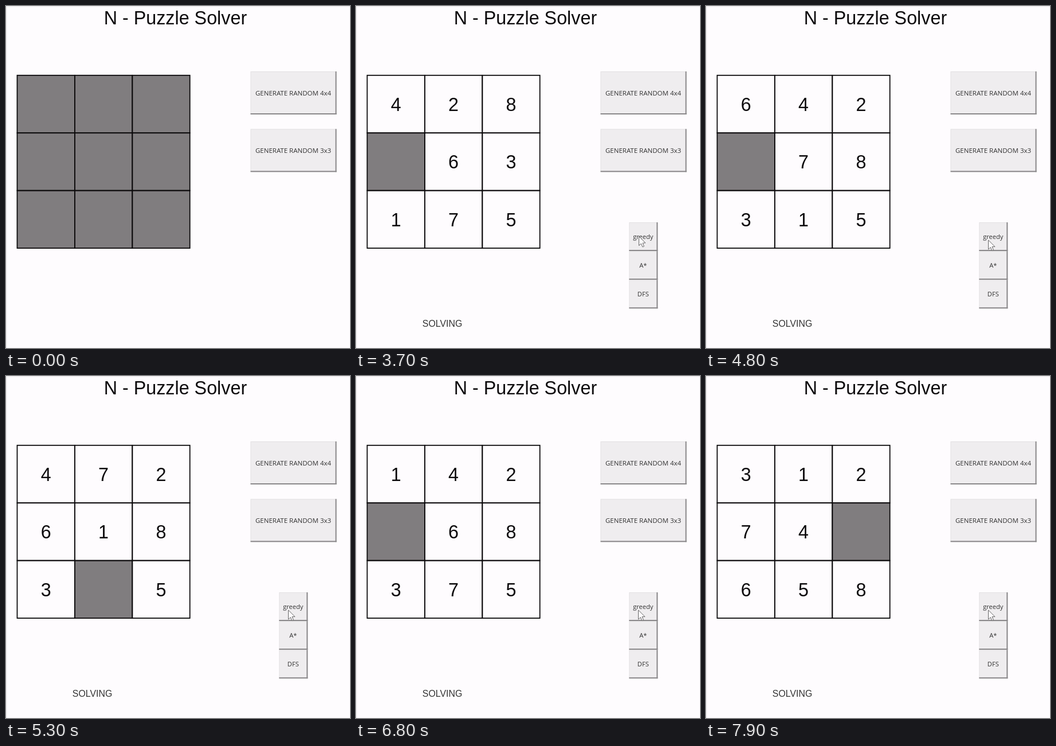
An HTML page with a canvas for the animation above (8 s loop, 600 px wide and 596 px high).

```html
<!DOCTYPE html>
<html lang="en">
<head>
<meta charset="utf-8">
<title>N - Puzzle Solver</title>
<style>
html, body { margin: 0; width: 100%; height: 100%; overflow: hidden; background: #fefcfe; }
canvas { display: block; }
</style>
</head>
<body>
<canvas id="stage" width="600" height="596"></canvas>
<script>
const ctx = document.getElementById('stage').getContext('2d');
const LOOP = 8000, BLOCK_AT = 1800, BOARD_AT = 1900, SOLVE_AT = 3700;
const STEP_START = 3660, STEP = 110;
const START = '4280' .slice(0, 3) + '063175';
const MOVES = '6382463713' + '647136471' + '471476376' + '3764137658'; // tile that slides into the gap
const GREY = '#807d7f', FACE = '#efedef';
const ARIAL = '"Liberation Sans", Arial, sans-serif';
const UI = '"Open Sans", "Noto Sans", sans-serif';

function rect(x, y, w, h, color) {
  ctx.fillStyle = color;
  ctx.fillRect(x, y, w, h);
}

function text(str, x, y, size, family, color) {
  ctx.font = `${size}px ${family}`;
  ctx.textAlign = 'center';
  ctx.fillStyle = color;
  ctx.fillText(str, x, y);
}

function button(label, x, y, w, h, size) {
  rect(x, y, w, h, '#e2e0e2');
  rect(x + 1, y + 1, w - 1, h - 1, FACE);
  rect(x, y + h - 2, w, 2, '#8a888a');
  rect(x + w - 2, y, 2, h, '#8a888a');
  text(label, x + w / 2 - 0.5, y + h / 2 + 4.2, size, UI, '#333');
}

function boardAt(t) {
  const cells = [...START];
  const count = Math.max(0, Math.floor((t - STEP_START) / STEP));
  for (const tile of MOVES.slice(0, count)) {
    const from = cells.indexOf(tile), gap = cells.indexOf('0');
    cells[gap] = tile;
    cells[from] = '0';
  }
  return cells;
}

function drawBoard(t) {
  const cells = t < BOARD_AT ? Array(9).fill('0') : boardAt(t);
  const size = 100.4;
  ctx.strokeStyle = '#0c0a0c';
  ctx.lineWidth = 1.8;
  cells.forEach((tile, i) => {
    const x = 19.5 + (i % 3) * size, y = 120.8 + Math.floor(i / 3) * size;
    rect(x, y, size, size, tile === '0' ? GREY : '#fefcfe');
    if (tile !== '0') text(tile, x + size / 2, y + 62, 32.3, ARIAL, '#0c0a0c');
  });
  for (let i = 0; i < 9; i++) {
    ctx.strokeRect(19.5 + (i % 3) * size, 120.8 + Math.floor(i / 3) * size, size, size);
  }
}

const ease = (t, a, b) => {
  const p = Math.min(1, Math.max(0, (t - a) / (b - a)));
  return p * p * (3 - 2 * p);
};

function drawCursor(t) {
  const go = ease(t, 2750, 3550), settle = ease(t, 3700, 4000);
  ctx.save();
  ctx.translate(450 + 43.5 * go - settle, 250 + 151.5 * go + 6.5 * settle);
  ctx.beginPath();
  [[0, 0], [0, 16], [3.8, 12.6], [6.4, 18.4], [9, 17.3], [6.5, 11.6], [11.4, 11.4]]
    .forEach(p => ctx.lineTo(...p));
  ctx.closePath();
  ctx.fillStyle = '#fefcfe';
  ctx.fill();
  ctx.strokeStyle = '#666';
  ctx.lineWidth = 1;
  ctx.stroke();
  ctx.restore();
}

function draw(t) {
  rect(0, 0, 600, 596, '#fefcfe');
  rect(0, 0, 600, 1.5, '#eeecee');
  rect(0, 0, 1.5, 596, '#eeecee');
  text('N - Puzzle Solver', 295.4, 32, 32.3, ARIAL, '#0c0a0c');
  drawBoard(t);
  button('GENERATE RANDOM 4x4', 426.5, 114, 150, 75, 11.5);
  button('GENERATE RANDOM 3x3', 426.5, 214.3, 150, 75, 11.5);
  if (t >= BOARD_AT) {
    ['greedy', 'A*', 'DFS'].forEach((label, i) => button(label, 476.3, 377 + 50.1 * i, 50, 50, 11.1));
    drawCursor(t);
  } else if (t >= BLOCK_AT) {
    rect(476.3, 427, 50, 100.4, FACE);
  }
  if (t >= SOLVE_AT) text('SOLVING', 150.6, 558.5, 15.9, ARIAL, '#333');
}

const begin = performance.now();
function frame() {
  draw((performance.now() - begin) % LOOP);
  requestAnimationFrame(frame);
}
frame();
</script>
</body>
</html>
```
